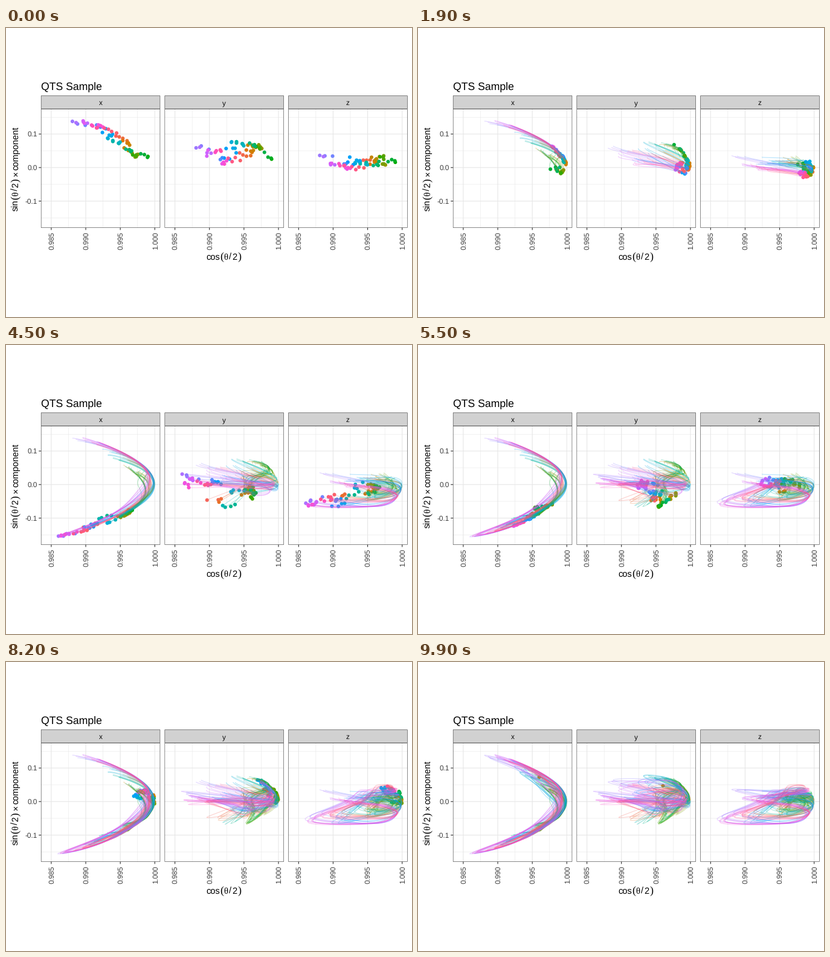
These frames come from a looping animation (672 px wide and 480 px high, 10 s). A matplotlib script:

```python
import numpy as np
import matplotlib.pyplot as plt
from matplotlib.animation import FuncAnimation
from matplotlib.collections import LineCollection
from matplotlib.patches import Rectangle

W, H, DPI = 672, 480, 96
FRAMES, SUBJECTS, REPEATS = 100, 16, 4
CURVES = SUBJECTS * REPEATS
LAST = 6  # the one curve whose dot outlives the others
LEFT, TOP, SIDE, STEP, STRIP = 57.9, 134.5, 197.3, 204.7, 22.2
PT = 72 / DPI
SANS, SERIF = "Liberation Sans", "Liberation Serif"
GAMMA = 1.22

plt.rcParams.update({"path.snap": False, "text.hinting": "none",
                     "font.family": SANS})
rng = np.random.default_rng(7)


def grey(v):
    return (v ** GAMMA,) * 3


def hcl(hue, chroma=100, lum=65):
    """Polar LUV to display RGB."""
    a = np.radians(hue)
    u = chroma * np.cos(a) / (13 * lum) + 0.1978
    v = chroma * np.sin(a) / (13 * lum) + 0.4683
    y = ((lum + 16) / 116) ** 3
    xyz = np.array([9 * y * u / (4 * v), y, y * (12 - 3 * u - 20 * v) / (4 * v)])
    lin = np.array([[3.2406, -1.5372, -0.4986],
                    [-0.9689, 1.8758, 0.0415],
                    [0.0557, -0.2040, 1.0570]]) @ xyz
    lin = np.clip(lin, 0, 1)
    rgb = np.where(lin > 0.0031308, 1.055 * lin ** (1 / 2.4) - 0.055, 12.92 * lin)
    return np.clip(rgb, 0, 1) ** GAMMA


def px(w, panel=0):
    return 246.3 - (1 - w) * 11427 + panel * STEP


def py(v):
    return 231.8 - 557 * v


def loop(vals, t):
    """Smooth closed curve through vals at KNOTS."""
    knots = np.concatenate([[KNOTS[-1] - 1], KNOTS, [1, 1 + KNOTS[1]]])
    vals = np.concatenate([vals[-1:], vals, vals[:2]])
    slope = np.gradient(vals, knots, axis=0)
    k = np.clip(np.searchsorted(knots, t, side="right") - 1, 1, len(KNOTS))
    h = (knots[k + 1] - knots[k])[:, None]
    s = (t - knots[k])[:, None] / h
    return ((2 * s**3 - 3 * s**2 + 1) * vals[k] + (s**3 - 2 * s**2 + s) * h * slope[k]
            + (3 * s**2 - 2 * s**3) * vals[k + 1] + (s**3 - s**2) * h * slope[k + 1])


def component(mean, tilt, spread, low, high):
    """Poses for every curve: a mean gait, a tilt by hue, and personal variation."""
    shape = (len(KNOTS), SUBJECTS)
    person = np.repeat(rng.normal(0, spread, shape), REPEATS, axis=1)
    trial = rng.normal(0, spread / 3, (len(KNOTS), CURVES))
    poses = np.array(mean)[:, None] + np.outer(tilt, lean) + person + trial
    return loop(np.clip(poses, low, high) * 1e-3, times)


KNOTS = np.array([0, .19, .35, .46, .56, .70, .83])
times = np.linspace(0, 1, FRAMES)
ids = np.arange(CURVES)
lean = np.cos(2 * np.pi * (ids - 50) / CURVES)  # 1 at magenta, -1 at green

parts = [
    component([87, 30, -72, -115, -89, -59, 20],
              [48, 34, 15, -36, -28, -17, 12], 7, -161, 156),
    component([52, 15, 6, -16, -33, -8, 27],
              [-4, -17, -7, 15, 29, 4, 10], 15, -76, 77),
    component([19, -12, -40, -25, 2, 26, 21],
              [0, -5, -17, -25, -3, 4, 10], 11, -65, 50),
]
# A unit quaternion: the cosine follows from the three components.
cosine = np.sqrt(1 - sum(p**2 for p in parts))
tracks = [np.stack([px(cosine, i), py(p)], axis=-1).swapaxes(0, 1)
          for i, p in enumerate(parts)]
colors = np.array([hcl(15 + 360 * i / CURVES) for i in ids])

fig = plt.figure(figsize=(W / DPI, H / DPI), dpi=DPI, facecolor="white")
ax = fig.add_axes([0, 0, 1, 1])
ax.axis("off")


def line(xs, ys, color, width=1.07, z=1):
    ax.plot(xs, ys, color=color, lw=width * PT, zorder=z, solid_capstyle="butt")


def label(x, y, s, size, color="black", ha="left", rot=0, family=SANS):
    ax.text(x, y, s, fontsize=size, color=color, ha=ha, va="baseline",
            rotation=rot, rotation_mode="anchor", family=family, zorder=7)


def box(x, y, w, h, fill, z, edge=.53):
    """Rectangle with its thin border kept inside."""
    ax.add_patch(Rectangle((x + edge / 2, y + edge / 2), w - edge, h - edge,
                           facecolor=fill, edgecolor=grey(.2), lw=edge * PT, zorder=z))


def formula(x, y, pieces, rot=0):
    """Place (offset, text, family, size) pieces along one baseline."""
    for off, s, family, size in pieces:
        pos = (x, y - off) if rot else (x + off, y)
        label(*pos, s, size, rot=rot, family=family)


def half_angle(name, start):
    return [(0, name, SANS, 11), (start, "(", SERIF, 13.5),
            (start + 6, "θ", SERIF, 11), (start + 15, "/", SANS, 11),
            (start + 20.3, "2", SANS, 11), (start + 29.5, ")", SERIF, 13.5)]


dots, trails = [], []
for i, name in enumerate("xyz"):
    x = LEFT + i * STEP
    right, bottom = x + SIDE, TOP + SIDE
    for v in (-.15, -.05, .05, .15):
        line([x, right], [py(v)] * 2, grey(.92), .53)
    for w in (.9875, .9925, .9975):
        line([px(w, i)] * 2, [TOP, bottom], grey(.92), .53)
    for v in (-.1, 0, .1):
        line([x, right], [py(v)] * 2, grey(.92))
    for w in (.985, .99, .995, 1):
        gx = px(w, i)
        line([gx] * 2, [TOP, bottom], grey(.92))
        line([gx] * 2, [bottom, bottom + 3.67], grey(.2))
        label(gx + 4.2, 368, f"{w:.3f}", 8.8, grey(.3), rot=90)
    box(x, TOP - STRIP, SIDE, STRIP, grey(.85), 5)
    box(x, TOP, SIDE, SIDE, "none", 6)
    label(x + SIDE / 2, 128.2, name, 8.8, grey(.1), ha="center")

    clip = Rectangle((x, TOP), SIDE, SIDE, transform=ax.transData)
    dot = ax.scatter([], [], s=(6.1 * PT) ** 2, linewidths=0, zorder=3)
    trail = LineCollection([], linewidths=1.07 * PT, alpha=.3, zorder=4, colors=colors)
    ax.add_collection(trail, autolim=False)
    for art in (dot, trail):
        art.set_clip_path(clip)
    dots.append(dot)
    trails.append(trail)

for v in (-.1, 0, .1):
    line([LEFT - 3.67, LEFT], [py(v)] * 2, grey(.2))
    label(51.8, py(v) + 4.2, f"{v:.1f}", 8.8, grey(.3), ha="right")

label(57.5, 102.2, "QTS Sample", 13.2)
formula(331, 385.3, half_angle("cos", 23))
formula(20.3, 304, half_angle("sin", 19) + [(58, "×", SANS, 11),
                                            (67.6, "component", SANS, 11)], rot=90)
ax.set(xlim=(0, W), ylim=(H, 0))


def draw(f):
    shown = [LAST] if f == FRAMES - 1 else ids
    for track, dot, trail in zip(tracks, dots, trails):
        dot.set_offsets(track[shown, f])
        dot.set_facecolors(colors[shown])
        trail.set_segments(track[:, :f + 1] if f else [])
    return dots + trails


anim = FuncAnimation(fig, draw, frames=FRAMES, interval=100, repeat=True,
                     repeat_delay=0, blit=False)
plt.show()
```
